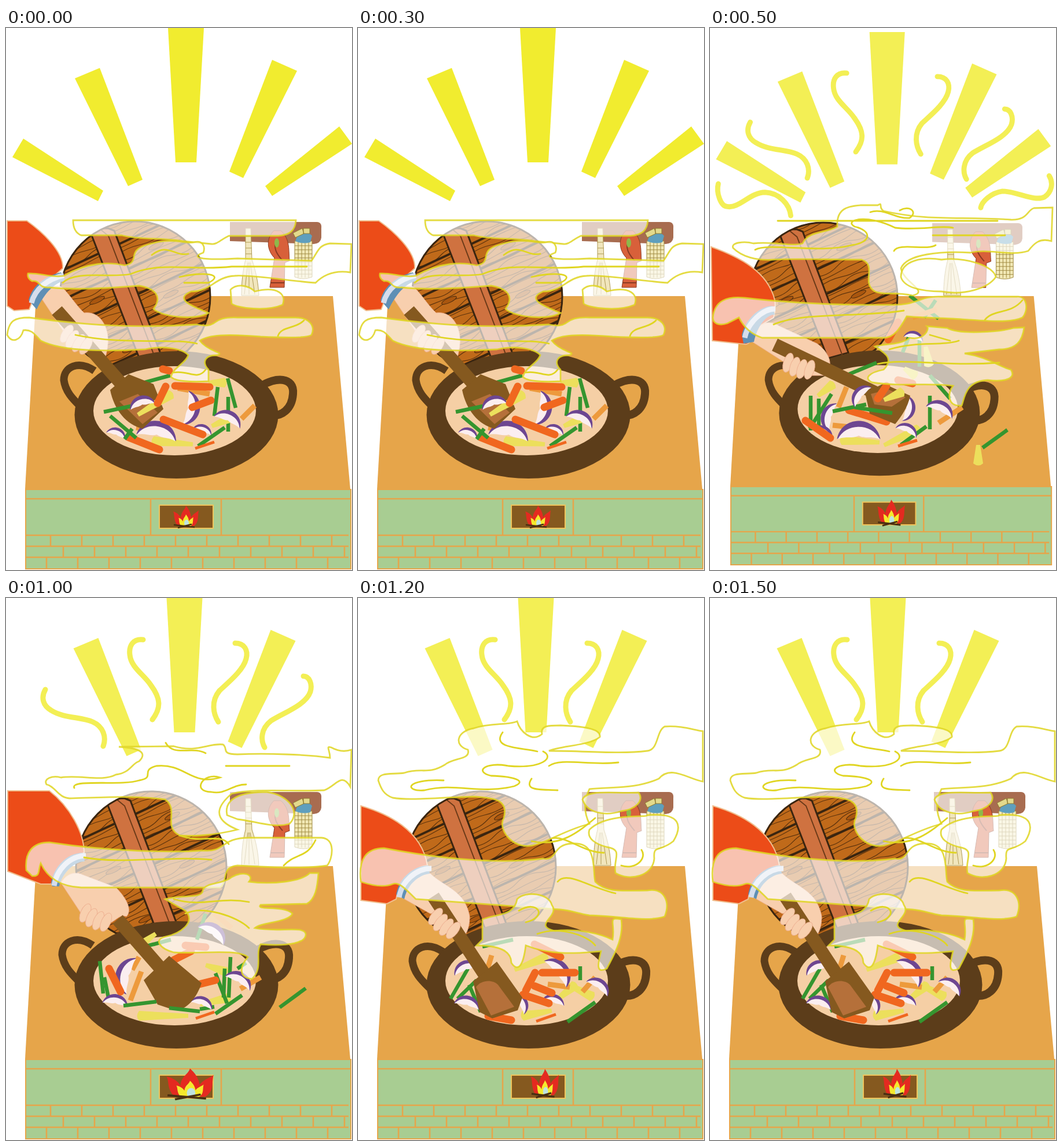
An HTML page for the animation above (1700 ms loop, 598 by 936 pixels).

```html
<!DOCTYPE html>
<html lang="en">
<head>
<meta charset="utf-8">
<title>Cooking on the stove</title>
<style>
  html, body { margin: 0; height: 100%; overflow: hidden; background: #fff; }
  svg { display: block; width: 100vw; height: 100vh; }
</style>
</head>
<body>
<svg id="stage" viewBox="0 0 598 936" preserveAspectRatio="none"></svg>
<script>
const SKIN = '#f8cfae', WOOD = '#85591f', IRON = '#5c3d1a', ORANGE = '#e6a54a', STEAM = '#e0d522';

const shape = (d, fill, extra = '') => `<path d="${d}" fill="${fill}" ${extra}/>`;
const line = (d, color, width, cap = 'butt') =>
  `<path d="${d}" fill="none" stroke="${color}" stroke-width="${width}" stroke-linecap="${cap}"/>`;
const group = (transform, content) => `<g transform="${transform}">${content}</g>`;
const range = (n, fn) => Array.from({ length: n }, (_, i) => fn(i)).join('');

const RAYS = [
  'M280 0H342L329 232H293Z', 'M119 87L162 69L236 262L211 273Z', 'M460 55L503 74L410 259L386 248Z',
  'M30 191L168 281L159 299L11 223Z', 'M576 170L598 200L460 290L448 273Z'
];
const WAVES = [
  'M237 72C220 70 212 82 214 98C216 120 238 132 250 150C268 174 268 190 253 210',
  'M396 78C412 78 419 90 415 105C410 125 385 145 369 160C354 178 358 200 367 214',
  'M68 158C60 172 64 186 78 194C100 208 130 205 150 214C168 222 174 240 168 256',
  'M514 135C524 135 530 148 526 162C518 185 480 198 458 212C440 226 440 246 447 258',
  'M12 266C8 281 16 306 28 306C48 310 68 281 94 281C119 282 137 302 139 322',
  'M592 252C600 265 596 281 584 289C566 298 535 279 510 279C490 282 474 297 472 308'
];

const rays = s => group(`translate(${s.rayShift} 0)`,
    RAYS.slice(0, s.rays).map(d => shape(d, s.rayColor)).join('')) +
  WAVES.slice(0, s.waves).map(d => line(d, s.rayColor, 9, 'round')).join('');

function utensils() {
  const bottleGrid = range(4, i => `M${505 + i * 6} 370V431`) + range(8, i => `M499 ${376 + i * 7}H529`);
  return shape('M387 335H538Q546 336 545 345V362Q544 372 532 373L387 368Z', '#a86c50') +
    shape('M414 346H423L425 400C432 420 436 440 437 462H407C407 440 409 420 414 400Z', '#f1e6bd', 'stroke="#b09a55"') +
    line('M418 405L412 460M420 405V460M422 405L430 460M413 360H424M413 370H424M414 380H425M414 390H425', '#b09a55', 1) +
    shape('M463 350C448 365 452 385 464 397L456 448H481L482 405L490 402C488 385 492 365 475 350Z', '#d8603a', 'stroke="#8a3a22"') +
    line('M468 364C460 382 470 392 478 402M457 440H481', '#8a3a22', 2) +
    '<ellipse cx="468" cy="371" rx="4" ry="8" fill="#8fb84a"/>' +
    shape('M499 368H529V430Q514 436 499 430Z', '#f2e9b6', 'stroke="#a08a40"') + line(bottleGrid, '#a08a40', 1) +
    shape('M500 368L505 355C512 348 522 352 529 359L526 370Q512 374 500 368Z', '#5f9fbd') +
    shape('M496 354L512 346L515 355L500 362ZM514 346H525V355H514Z', '#e3d98c', 'stroke="#8d7a30"');
}

function stove(s) {
  const [x, y, sx, sy] = s.fire;
  const flame = 'M-15 -2C-22 -12 -19 -20 -22 -26C-14 -24 -10 -18 -9 -15C-8 -27 -2 -28 0 -36' +
    'C5 -30 8 -24 9 -16C12 -22 18 -24 22 -28C20 -18 23 -8 14 -1Z';
  const joints = [77, 99, 70].map((start, row) =>
    range(10, i => `M${start + i * 54} ${876 + row * 19}v19`)).join('');
  return shape('M52 463H565L595 796H33Z', ORANGE) +
    shape('M34 797H596V934H34Z', '#a8cd92', `stroke="${ORANGE}" stroke-width="2"`) +
    line('M34 813H596M250 813V876M372 813V876M34 876H592M34 895H592M34 914H592' + joints, ORANGE, 2.5) +
    shape('M265 824H358V864H265Z', WOOD, 'stroke="#efc45c" stroke-width="2"') +
    group(`translate(${x} ${y}) scale(${sx} ${sy})`,
      shape(flame, '#e42a20') + group('scale(.58)', shape(flame, '#f5e92d')) +
      '<ellipse cx="1" cy="-6" rx="4" ry="6" fill="#bfe3e0"/>' +
      line('M-21 -3L15 1M-14 2L10 -4', '#4a2f12', 2.5));
}

function lid(x) {
  const grain = range(27, i => `M-132 ${i * 10 - 128}q22 ${i % 3 * 7 - 9} 44 0t44 0t44 0t44 0t44 0t44 0`);
  const planks = range(5, i => `M-132 ${i * 46 - 94}H132`);
  const knots = [[-62, -22], [70, -64], [58, 22], [-46, 78]].map(([a, b]) =>
    `<ellipse cx="${a}" cy="${b}" rx="14" ry="4" fill="#a9560f" stroke="#4a2a0c"/>`).join('');
  return group(`translate(${x} 464)`,
    '<circle r="131" fill="#c06a1a"/><g clip-path="url(#lidEdge)">' +
    group('rotate(-25)', line(grain, '#5d330d', 1.2) + knots + line(planks, '#3a2510', 4)) +
    shape('M-75 -106L-62 -118H-46L-36 -114L44 98L8 108Z', '#cf7240', 'stroke="#3a2510" stroke-width="3"') +
    line('M-62 -118L-46 -105L34 104', '#6b3a18', 2) +
    '</g><circle r="130" fill="none" stroke="#3a2510" stroke-width="3"/>');
}

const wok = s =>
  group(`translate(${s.leftGrip})`, line('M153 592C125 573 100 585 100 608C103 630 118 643 130 655', IRON, 13)) +
  group(`translate(${s.rightGrip})`, line('M440 619C465 602 499 602 496 632C494 660 475 670 460 669', IRON, 14)) +
  `<ellipse cx="294.5" cy="668" rx="176" ry="110" fill="${IRON}"/>` +
  '<ellipse cx="291.5" cy="661" rx="140.5" ry="77" fill="#f5cfa5"/>';

// Ingredients: kind, then the two ends of a strip; an onion has x, y, angle, scale.
const STRIPS = {
  carrot: ['#f0671f', 13, 'round'], shred: ['#f0671f', 5, 'butt'],
  squash: ['#ed9a3c', 9, 'butt'], leek: ['#35952f', 6.5, 'butt']
};
function ingredient(kind, [a, b, c, d]) {
  if (kind === 'onion') return group(`translate(${a} ${b}) rotate(${c}) scale(${d})`,
    shape('M-25 10C-20 -18 20 -18 25 10C12 0 -12 0 -25 10Z', '#6d4691') +
    shape('M-24 10C-15 -9 15 -9 24 10C14 6 8 10 0 6C-8 10 -14 6 -24 10Z', '#fbeef0'));
  if (kind === 'corn') {
    const angle = Math.atan2(d - b, c - a) * 180 / Math.PI, length = Math.hypot(c - a, d - b);
    return group(`translate(${a} ${b}) rotate(${angle})`,
      shape(`M-5 -3L${length} -8Q${length + 7} 0 ${length} 9L-5 4Z`, '#ecdf5c'));
  }
  return line(`M${a} ${b}L${c} ${d}`, ...STRIPS[kind]);
}
const food = items => Object.entries(items).map(([kind, text]) =>
  text.split(',').map(item => ingredient(kind, item.trim().split(' ').map(Number))).join('')).join('');

function arm({ sleeve, cuff, hand, fingers, handle, blade, scoop }) {
  const [x, y, tilt] = fingers;
  return shape(sleeve, '#ec4c18', 'stroke="#f0bd8c" stroke-width="2"') +
    shape(hand, SKIN, 'stroke="#f0b08c"') + shape(cuff, '#5f8fb5') +
    group('translate(5 5)', line(cuff.split('L')[0], '#d5ddec', 9)) +
    line(handle, WOOD, 23) + shape(blade, WOOD) + shape(scoop, '#b5703a') +
    group(`translate(${x} ${y}) rotate(${tilt})`, range(4, i =>
      `<ellipse cx="${i * 13}" cy="${i % 3 ? 3 : 0}" rx="8" ry="17" fill="${SKIN}" stroke="#eeb293"/>`));
}

const steam = (clouds, curls) =>
  clouds.map(d => shape(d, '#fff', `fill-opacity=".66" stroke="${STEAM}" stroke-opacity=".85" stroke-width="2.8"`)).join('') +
  line(curls, STEAM, 2.8, 'round');

const scenes = [
  {
    until: 500, rayColor: '#f1ec2f', rays: 5, rayShift: 0, waves: 0,
    lid: 223, fire: [311, 861, 1, 1], leftGrip: '0 0', rightGrip: '0 0',
    food: {
      leek: '240 612 284 600, 366 620 360 670, 383 605 397 656, 384 637 384 697, 332 722 378 690',
      corn: '355 612 378 612, 318 719 255 714, 360 685 390 672',
      squash: '297 622 352 632, 407 675 430 652, 225 690 272 697',
      onion: '322 658 100 1.2, 262 694 10 1.4, 192 698 20 .7, 340 692 15 .7, 386 672 25 1',
      carrot: '271 589 282 592, 292 618 352 620, 322 655 354 643, 272 676 340 702, 212 707 265 728',
      shred: '327 726 360 715'
    },
    topFood: {
      leek: '169 663 216 653, 180 670 225 708, 205 710 218 692',
      corn: '232 665 285 632', onion: '234 645 -15 .9', carrot: '262 648 276 619'
    },
    arm: {
      sleeve: 'M2 333H36C60 350 100 385 98 415L70 440C50 450 45 475 40 486L14 488L2 480Z',
      cuff: 'M39 470C45 445 68 428 95 422L102 436C85 440 68 455 53 486Z',
      hand: 'M60 465C68 448 85 442 97 448C110 460 120 478 135 492C165 488 178 520 176 545C173 575 166 582 160 583C150 560 130 552 110 540Z',
      fingers: [105, 528, 32], handle: 'M88 488L200 615',
      blade: 'M180 625L212 598L255 615L272 658L236 692C208 685 187 660 180 625Z',
      scoop: 'M196 645L228 632L262 664L236 684Z'
    },
    clouds: [
      'M116 332H501C500 350 490 358 470 359H385C370 366 365 374 355 373L305 368C270 362 230 366 200 358H130C120 354 116 345 116 332Z',
      'M38 424C55 422 80 432 100 428C140 404 180 404 205 410C235 404 205 385 245 374C290 360 310 374 325 370C340 366 345 378 341 388C320 395 330 402 400 398L528 402C540 385 540 375 560 372L597 373L595 422C570 418 550 425 535 440C500 438 420 425 395 428C360 430 355 455 320 455C290 468 320 480 350 492C330 505 270 500 255 485C270 465 260 450 230 445C170 450 110 452 75 448C55 450 60 435 45 437Q36 432 38 424Z',
      'M2 530C5 505 15 500 40 500C150 515 230 518 330 512C370 520 350 498 400 500H500C525 500 535 515 528 530C520 536 480 535 440 533C380 528 350 530 335 540C350 560 380 560 365 565C340 565 340 580 350 590V610C320 612 290 610 285 602C290 585 310 580 315 565C305 553 270 548 240 555C180 558 100 560 60 540C50 530 45 520 30 522C25 540 10 545 2 530Z',
      'M388 452C400 440 420 445 430 455C470 445 485 460 478 478C450 490 400 484 390 476Z'
    ],
    curls: 'M252 392C280 370 290 395 315 390M98 440C120 418 180 432 215 425C270 402 320 420 390 412H520M300 430C340 420 380 425 350 440H308M470 532C475 515 500 520 515 505M120 530C200 548 290 535 330 545M290 595C315 590 330 610 345 590'
  },
  {
    until: 700, fit: 'translate(2.5 7) scale(.986 .985)', rayColor: '#f3ef55', rays: 5, rayShift: -3, waves: 6,
    lid: 196, fire: [315, 863, 1.1, 1.2], leftGrip: '0 2', rightGrip: '0 12',
    food: {
      corn: '374 555 379 582, 190 632 212 615, 288 716 228 712, 305 718 360 692, 464 725 464 752, 340 590 355 600',
      leek: '345 462 395 502, 370 500 390 470, 333 560 345 530, 362 535 362 585, 235 600 288 578, 174 635 174 695, 188 640 188 690, 172 692 210 632, 380 635 380 693, 380 600 415 640, 330 720 374 688, 471 725 514 694',
      squash: '350 500 392 486, 222 655 236 620, 212 686 270 692, 395 682 436 655',
      onion: '353 531 15 .7, 257 695 0 1.5, 203 670 -75 1, 345 658 100 .9, 342 692 25 .8, 400 655 25 1, 198 697 35 .8',
      carrot: '308 538 325 508, 165 678 208 708, 325 608 350 614, 240 660 305 680',
      shred: '325 722 358 712'
    },
    topFood: { leek: '212 662 270 650, 250 655 315 665', corn: '305 640 332 628', onion: '258 632 -50 .9', carrot: '290 640 305 618' },
    arm: {
      sleeve: 'M2 378C50 395 100 420 112 470Q114 485 110 500L85 515C76 530 70 548 60 546L4 540Z',
      cuff: 'M55 530C60 505 85 480 108 480L112 495C95 495 80 520 76 542L58 545Z',
      hand: 'M70 540C80 510 100 502 120 515L185 545C205 560 215 580 200 600H170L125 575Z',
      fingers: [135, 578, 18], handle: 'M112 547L290 632',
      blade: 'M268 630L300 614L346 635C342 655 330 672 320 684L276 666Z',
      scoop: 'M278 632L308 624L338 638L314 654L284 650Z'
    },
    clouds: [
      'M40 380C35 370 60 368 75 372C110 368 140 378 160 372C170 350 200 355 220 343C218 310 240 308 260 306H290C300 300 290 310 300 316C380 334 430 325 520 331C550 332 548 314 560 311L592 310L590 368C570 362 560 372 550 385C520 395 480 380 450 388C400 385 340 390 330 415C335 440 380 455 350 462C320 455 300 462 285 455C260 440 290 410 262 400C200 400 150 398 110 400C80 402 55 395 40 380Z',
      'M5 500C8 470 30 463 60 466C180 480 280 478 310 478C360 480 360 462 400 464H530C550 462 550 490 540 500C520 510 480 506 420 502C380 500 360 500 340 498C330 515 320 535 300 535H90C75 530 60 520 50 500L30 510C15 515 5 510 5 500Z',
      'M285 550C300 545 330 548 345 535C370 540 380 520 375 515L410 518C430 530 500 525 525 518L543 517C540 540 530 555 500 555L440 562C480 568 500 585 520 590C530 605 510 612 480 608C440 610 440 640 435 652C410 655 410 630 420 618C380 612 330 620 280 612C265 605 275 595 300 590C320 570 300 560 285 550Z',
      'M330 430C330 400 370 395 400 400C440 395 490 410 494 430C480 450 440 462 400 455C365 455 335 448 330 430Z'
    ],
    curls: 'M117 333H497M78 383C100 370 190 390 245 375C280 370 280 350 250 343C230 332 270 320 320 345C360 350 400 340 420 345M385 358H510M277 318C300 310 320 330 345 328C360 318 345 305 328 315M318 385C325 370 375 385 390 375M110 512C160 490 260 500 335 488M475 504C490 485 520 495 540 470M310 555C360 540 400 550 430 540M290 580C340 570 400 585 500 578M380 530L415 540'
  },
  {
    until: 1200, rayColor: '#f3ef55', rays: 3, rayShift: -2.5, waves: 4,
    lid: 251, fire: [318, 863, 1.85, 1.4], leftGrip: '-3 8', rightGrip: '-7 -10',
    food: {
      corn: '310 722 230 722, 255 583 225 605, 340 700 385 690, 350 635 380 645',
      squash: '215 695 234 645, 405 675 440 655, 360 545 390 570, 218 642 230 620',
      leek: '162 627 168 683, 170 655 177 690, 345 545 330 590, 225 606 285 590, 362 648 382 700, 378 640 376 690, 388 620 385 690, 400 640 415 630, 473 707 518 674, 362 718 408 686, 335 710 360 706',
      onion: '204 650 -75 1.3, 190 694 10 .9, 360 575 35 1.1, 405 657 30 1, 340 697 20 .8',
      carrot: '178 640 198 680, 330 668 362 660, 290 625 320 610, 310 600 345 603',
      shred: '328 726 360 715'
    },
    topFood: { leek: '203 704 260 697, 282 708 335 714' },
    arm: {
      sleeve: 'M3 333H75C110 360 135 405 135 440C105 445 85 470 78 494H60L3 472Z',
      cuff: 'M78 492C82 465 105 440 133 440L136 455C115 455 95 480 92 498H80Z',
      hand: 'M95 492C105 475 120 472 132 478L190 500C210 520 218 540 208 550C195 545 190 560 170 565L130 545Z',
      fingers: [137, 544, 24], handle: 'M193 555L272 645',
      blade: 'M238 660L282 618L338 665C330 690 312 712 292 712L262 702Z', scoop: ''
    },
    clouds: [
      'M70 322C64 312 80 306 95 310C130 305 165 318 190 305C215 302 218 285 230 282C250 262 215 258 195 257L290 256C330 268 350 250 375 253C385 260 370 270 400 270C450 268 520 270 560 276C560 262 552 255 562 258Q580 268 597 262L595 326C580 300 570 325 550 332C500 335 430 328 390 338C370 355 350 380 400 400C360 410 320 412 300 410C270 395 300 365 275 348C220 340 150 345 110 346C90 345 85 325 70 322Z',
      'M35 470C32 440 45 422 75 422C180 438 290 440 340 436C380 440 370 414 420 414H545C570 415 565 450 555 462C520 468 450 465 400 462C370 465 385 490 370 500H130C90 498 70 480 60 458C55 470 60 482 45 480Z',
      'M275 520C300 512 340 520 340 505C345 490 375 495 390 482C410 470 430 478 420 490C460 495 510 490 525 475H540C538 500 535 520 520 528L440 530C430 540 480 530 495 545C490 560 440 560 430 570C470 578 515 565 518 580C520 595 490 602 440 598C430 615 445 640 425 658C400 655 405 635 418 620C400 605 330 615 290 612C265 605 255 590 275 585C300 580 330 560 310 540Z',
      'M382 375C375 340 420 335 450 335C490 340 510 370 490 390C460 398 430 385 400 382Z'
    ],
    curls: 'M118 328C110 312 200 325 230 315C260 310 230 298 260 290C310 285 320 325 370 310C340 300 320 335 355 335C380 340 390 322 415 322M380 290H490M276 250C290 275 320 255 345 268M300 410C340 425 370 405 385 425M480 462C500 440 520 450 535 418M135 448C200 460 290 445 355 452M290 520C340 535 370 515 420 525M310 545C340 530 400 550 420 570'
  },
  {
    until: 1700, rayColor: '#f3ef55', rays: 3, rayShift: -3.5, waves: 2,
    lid: 212, fire: [323, 860, 1.1, 1.3], leftGrip: '-6 19', rightGrip: '2 18',
    food: {
      corn: '275 640 325 620, 345 692 375 668, 330 714 285 722, 365 668 405 688',
      squash: '224 640 231 617, 388 680 410 655, 328 667 366 672',
      leek: '160 692 190 640, 172 692 205 660, 192 668 212 715, 384 636 384 660, 362 732 410 698, 215 602 268 590',
      onion: '185 636 -20 .9, 350 642 50 1.2, 418 668 35 .9, 190 697 15 .9, 338 693 10 .8, 284 698 60 .8',
      carrot: '318 647 375 647, 290 678 306 647, 285 685 330 700, 305 598 350 620, 305 670 335 682, 225 722 265 729',
      shred: '308 731 342 719'
    },
    topFood: {},
    arm: {
      sleeve: 'M5 359C50 372 110 400 120 462C95 465 70 490 66 520L50 528L5 522Z',
      cuff: 'M66 512C70 485 95 462 122 462L124 476C105 478 85 495 80 520Z',
      hand: 'M75 517C90 485 105 475 125 476C150 500 185 505 193 550C193 575 182 592 175 583C170 560 150 540 125 545Z',
      fingers: [134, 550, 38], handle: 'M130 515L222 655',
      blade: 'M199 662L240 628L284 690L276 712L232 726L210 715Z',
      scoop: 'M204 672C212 660 232 658 242 668L270 706L230 721Z'
    },
    clouds: [
      'M35 315C35 300 60 305 80 302C110 292 120 306 150 288C165 275 195 280 190 262C165 255 170 230 200 225C230 215 260 220 275 213C280 230 300 250 318 235C315 220 330 220 350 220C400 222 420 228 418 240C400 255 350 255 330 264C400 264 450 270 500 264C520 262 515 230 530 222C560 220 580 228 596 230V317C570 312 540 288 520 312C480 330 440 326 400 330C390 350 390 370 400 390C360 400 330 420 310 425C270 440 240 400 252 380C260 350 240 345 200 343C130 345 90 350 60 345C45 340 40 330 35 315Z',
      'M5 490C0 450 15 432 45 432C140 450 240 460 320 450C345 455 335 425 370 424C415 420 405 470 410 490C430 510 460 505 500 505C530 500 540 525 530 550C500 560 460 550 400 548C380 545 370 540 350 538L100 520C80 500 70 490 60 494Q40 502 5 490Z',
      'M215 555C240 545 270 550 275 520C290 505 330 510 335 530C350 550 300 565 340 575C380 570 420 580 440 590C445 560 430 550 455 555C460 590 440 620 430 640C410 650 415 630 420 610C390 612 340 620 290 600C285 640 275 645 265 630C265 600 220 600 205 600L215 590Z',
      'M400 400C430 370 500 380 500 375C560 370 560 395 545 420C520 440 510 425 512 450C510 480 470 490 445 475C440 450 460 435 430 430C410 425 395 415 400 400Z',
      'M388 348C395 330 440 338 485 336C495 350 480 365 455 368C425 378 395 370 388 348Z'
    ],
    curls: 'M148 315C80 312 80 335 115 332C170 318 210 340 270 325C295 315 265 308 230 307C200 300 220 282 260 290C320 295 340 275 320 265M250 232C230 260 280 258 310 265M330 290C350 275 400 290 450 284M300 312C285 335 320 330 345 332M300 420C350 430 380 405 410 380M335 415C360 410 390 440 425 440M345 490C360 470 400 500 445 510M455 462C480 470 500 450 490 435M278 540C310 520 330 550 290 560M310 580C350 565 400 585 410 600'
  }
];

const drawScene = s =>
  group(s.fit || '', rays(s) + utensils() + stove(s) + lid(s.lid) + wok(s)) +
  food(s.food) + arm(s.arm) + food(s.topFood) + steam(s.clouds, s.curls);

const stage = document.getElementById('stage');
stage.innerHTML = '<clipPath id="lidEdge"><circle r="130"/></clipPath>' +
  scenes.map(s => `<g class="scene" visibility="hidden">${drawScene(s)}</g>`).join('');
const layers = [...stage.querySelectorAll('.scene')];
const start = performance.now();

function play() {
  const time = (performance.now() - start) % 1700;
  const current = scenes.findIndex(s => time < s.until);
  layers.forEach((layer, i) => layer.setAttribute('visibility', i === current ? 'visible' : 'hidden'));
  requestAnimationFrame(play);
}
play();
</script>
</body>
</html>
```
